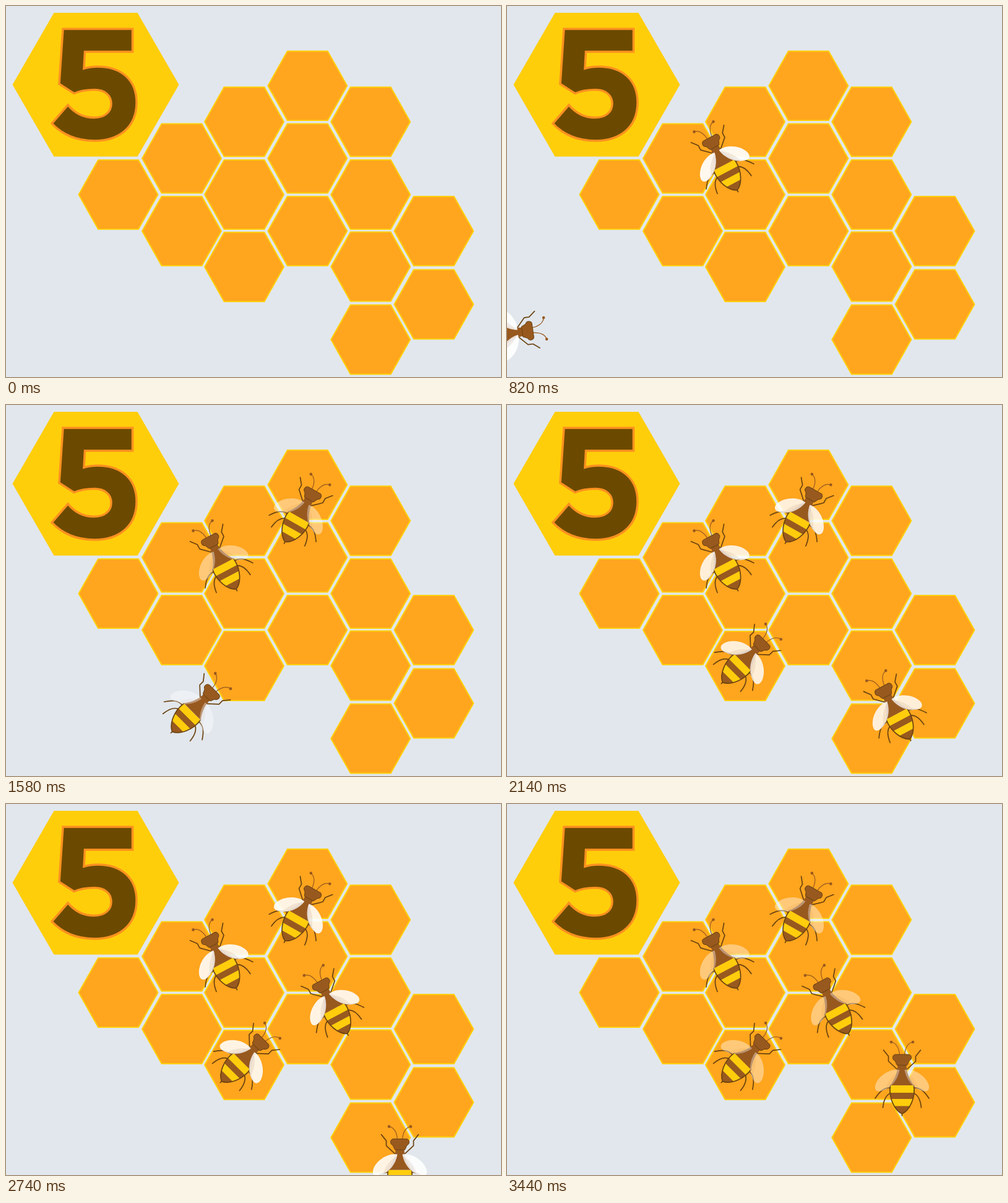
These frames come from a looping animation (800 by 600 pixels, 3460 ms). An HTML page:

```html
<!DOCTYPE html>
<html lang="en">
<head>
<meta charset="utf-8">
<title>Five bees</title>
<style>
  html, body { margin: 0; width: 100%; height: 100%; overflow: hidden; background: #e2e7ed; }
  svg { display: block; width: 800px; height: 600px; }
  .line { fill: none; stroke: #6b4310; stroke-width: 1.7; stroke-linecap: round; stroke-linejoin: round; }
  .brown { fill: #98591f; }
  .yellow { fill: #ffcd0c; }
</style>
</head>
<body>
<svg viewBox="0 0 800 600">
  <defs>
    <path id="cell" d="M-64 0 -32.5 -56H32.5L64 0 32.5 56H-32.5Z" fill="#ffa51e" stroke="#ffd00a" stroke-width="2"/>
    <clipPath id="belly"><path d="M-19 10H19C22 29 13 50 0 56C-13 50 -22 29 -19 10Z"/></clipPath>

    <g id="limbs">
      <path class="line" d="M-30 -47 -22 -37 -22 -29 -7 -15"/>
      <path class="line" d="M-17 14C-30 13 -36 20 -43.5 31"/>
      <path class="line" d="M-17 22C-27 25 -30 36 -31 46"/>
      <path class="line" d="M-4 -39C-5 -51 -9 -58 -17 -60" style="stroke:#98591f;stroke-width:1.2"/>
      <circle class="brown" cx="-17.5" cy="-60" r="2.3"/>
    </g>
    <g id="wing">
      <path d="M-4 -15C-18 -18 -38 -6 -43 9C-46 19 -39 22 -30 18C-18 13 -7 2 -4 -15Z" fill="#fff"/>
      <path d="M-5 -12C-15 -8 -25 6 -27 18C-16 12 -8 2 -5 -12Z" fill="#ddd0c8" opacity=".4"/>
    </g>

    <g id="body">
      <use href="#limbs"/>
      <use href="#limbs" transform="scale(-1 1)"/>
      <path class="line" d="M0 55V59"/>
      <path class="brown" d="M-7 -26H7C7 -12 10 -3 19 10H-19C-10 -3 -7 -12 -7 -26Z"/>
      <g clip-path="url(#belly)">
        <path class="brown" d="M-24 10H24V58H-24Z"/>
        <path class="yellow" d="M-24 10H24V22H-24ZM-24 32H24V43.500H-24Z"/>
      </g>
      <path class="line" d="M-19 10C-22 29 -13 50 0 56C13 50 22 29 19 10"/>
      <path class="brown" d="M-9 -40H9C16 -41 17 -32 12 -30C10 -28 10 -25 8 -22.500H-8C-10 -25 -10 -28 -12 -30C-17 -32 -16 -41 -9 -40Z" stroke="#6b4310"/>
    </g>
    <g id="wings">
      <use href="#wing"/>
      <use href="#wing" transform="scale(-1 1)"/>
    </g>
  </defs>

  <rect width="800" height="600" fill="#e2e7ed"/>
  <path d="M10.500 127.300 77.500 11H212.500L279.500 127.300 212.500 243.500H77.500Z" fill="#ffce0a"/>
  <path d="M92 37H204.500V74H127.500L126 101Q136 98 148 98C187 98 211 120 211 156C211 195 184 218 143 218C113 218 90 207 74 190L100 160C111 173 126 180.500 142 180.500C159 180.500 170 172 170 158C170 144 159 135.500 143 135.500C130 135.500 120 137 110 141.500L86 126Z"
        fill="#6b4a00" stroke="#fc9120" stroke-width="3.5"/>
  <g id="comb"></g>
  <g id="swarm"></g>
</svg>
<script>
  const LOOP = 3460, FLIGHT = 614, FLUTTER = 1860, RAD = Math.PI / 180;

  // Cell centres: column x, then the y of each cell in it
  const columns = [
    [181.5, 305], [284, 246.5, 364], [385, 187.3, 305, 422], [487.3, 129, 246.5, 364],
    [589.3, 187.3, 305, 421.5, 539.5], [691.5, 364, 482.5]
  ];

  // Each bee flies an arc of the given length and turn (degrees) to its end point.
  // course: direction of travel on arrival, tilt: how the bee rests
  const bees = [
    { start: 0,    end: [346, 248.3],   length: 650, turn: -58, course: -29.8, tilt: -27.8 },
    { start: 669,  end: [478.5, 172.7], length: 720, turn: 61,  course: 27,    tilt: 29.5 },
    { start: 1207, end: [388, 409],     length: 340, turn: 0,   course: 45,    tilt: 45 },
    { start: 1830, end: [525.5, 322],   length: 400, turn: 0,   course: -30.5, tilt: -28 },
    { start: 2444, end: [638.5, 445],   length: 260, turn: 0,   course: 0.8,   tilt: 0 }
  ];

  function add(parent, tag, attrs = {}) {
    const el = document.createElementNS('http://www.w3.org/2000/svg', tag);
    for (const key in attrs) el.setAttribute(key, attrs[key]);
    return parent.appendChild(el);
  }

  const comb = document.getElementById('comb');
  for (const [x, ...ys] of columns)
    for (const y of ys) add(comb, 'use', { href: '#cell', x, y });

  const swarm = document.getElementById('swarm');
  for (const bee of bees) {
    bee.el = add(swarm, 'g');
    add(bee.el, 'use', { href: '#body' });
    bee.wings = add(bee.el, 'use', { href: '#wings' });
  }

  function draw(t) {
    const alpha = 0.7 - 0.3 * Math.cos(2 * Math.PI * (t - 1540) / FLUTTER);
    for (const { el, wings, start, end, length, turn, course, tilt } of bees) {
      const p = Math.min(1, Math.max(0, (t - start) / FLIGHT));
      const left = (1 + Math.cos(Math.PI * p)) / 2;
      // Straight distance and bearing across the part of the arc still to fly
      const half = turn * left / 2 * RAD;
      const chord = length * left * (half ? Math.sin(half) / half : 1);
      const angle = course * RAD + half;
      const x = end[0] - chord * Math.sin(angle);
      const y = end[1] + chord * Math.cos(angle);
      el.setAttribute('transform', `translate(${x} ${y}) rotate(${tilt + turn * left})`);
      el.setAttribute('visibility', p > 0 ? 'visible' : 'hidden');
      wings.setAttribute('opacity', alpha);
    }
  }

  function tick() {
    draw(performance.now() % LOOP);
    requestAnimationFrame(tick);
  }
  tick();
</script>
</body>
</html>
```
